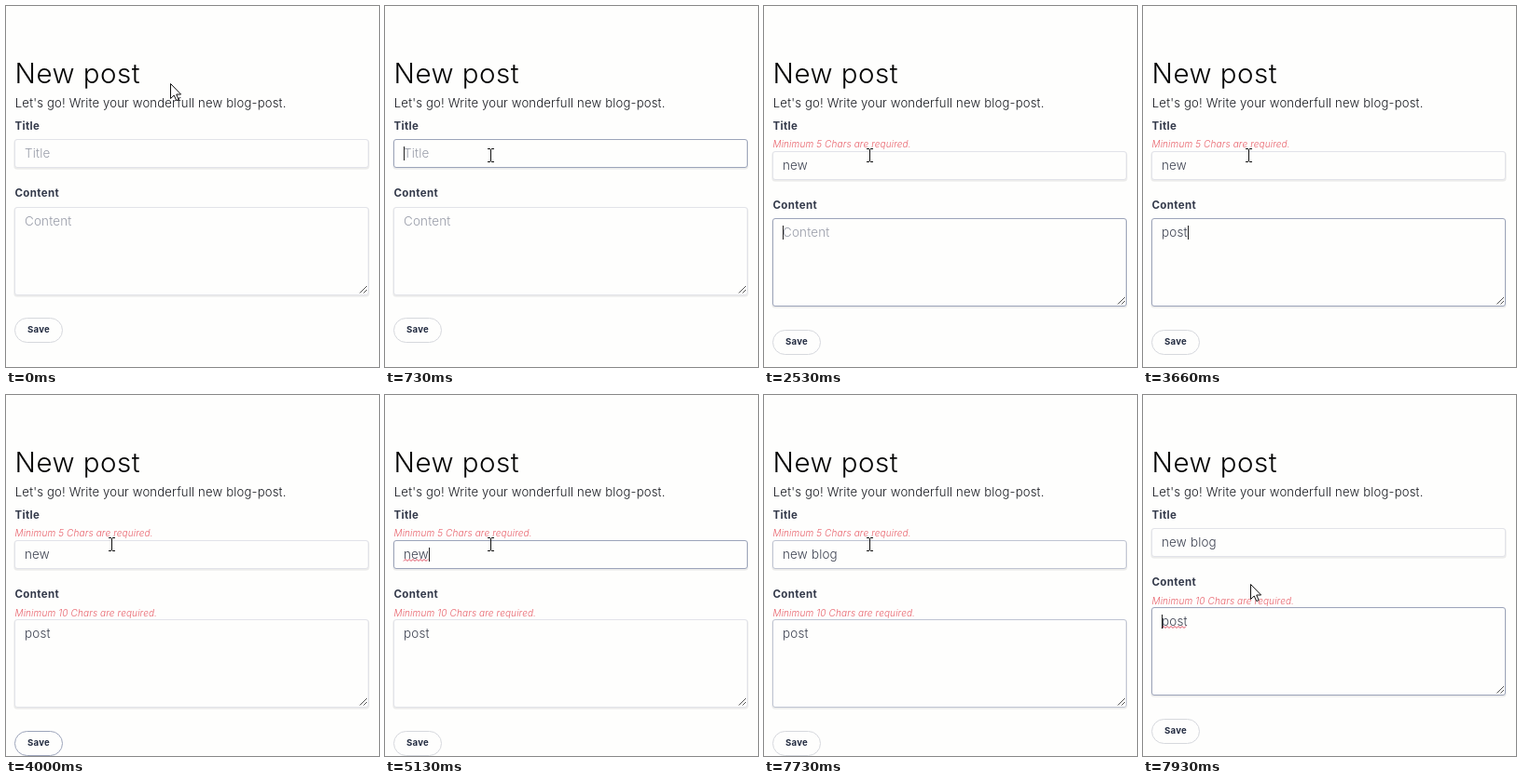
An HTML page that plays this animation: 400x388 px, repeating every 8000 ms.

```html
<!DOCTYPE html>
<html lang="en">
<head>
<meta charset="utf-8">
<title>New post</title>
<style>
  html, body { margin: 0; width: 100%; height: 100%; overflow: hidden; background: #fefefd; }
  svg { display: block; width: 400px; height: 388px; }
  text { font: 300 13px Inter, "Open Sans", sans-serif; white-space: pre; }
  .head { font-size: 29.5px; letter-spacing: .5px; fill: #050505; }
  .lead { font-size: 13.1px; letter-spacing: .18px; fill: #181a20; }
  .label { font-size: 11.5px; font-weight: 700; letter-spacing: .35px; fill: #343a4b; }
  .value { font-size: 13.4px; letter-spacing: .2px; }
  .error { font-size: 10px; font-style: italic; letter-spacing: .13px; fill: #e8606a; }
  .save { font-size: 9.6px; font-weight: 700; letter-spacing: .25px; fill: #222b40; text-anchor: middle; }
  .soft { fill: none; stroke: #000; }
  .box { fill: #fefefd; }
  .wave { fill: none; stroke: #e0455a; stroke-width: 1; }
</style>
</head>
<body>
<svg viewBox="0 0 400 388" aria-label="New post form">
  <rect width="400" height="388" fill="#fefefd"/>
  <text class="head" x="9.5" y="83">New post</text>
  <text class="lead" x="9.8" y="109">Let's go! Write your wonderfull new blog-post.</text>
  <text class="label" x="9.5" y="133">Title</text>
  <text class="error" id="titleError" x="9.5" y="152">Minimum 5 Chars are required.</text>
  <g id="title"></g>
  <g id="lower">
    <text class="label" x="9.5" y="205">Content</text>
    <text class="error" id="areaError" x="9.5" y="224.5">Minimum 10 Chars are required.</text>
  </g>
  <g id="area"></g>
  <g id="save">
    <rect class="box" id="saveBox" x="9.5" y=".5" width="51" height="26" rx="13"/>
    <text class="save" x="35" y="16">Save</text>
  </g>
  <path id="arrow" d="M.5 .5V16.5L4.2 13L6.8 18.6L9.2 17.5L6.7 12H11.6Z" fill="#fff" stroke="#111"/>
  <path id="beam" d="M-3 -6.5H0M1 -6.5H4M.5 -6V7M-3 7.5H0M1 7.5H4" fill="none" stroke="#111"/>
</svg>
<script>
const LOOP = 8000, ERROR_H = 12.7;
const $ = id => document.getElementById(id);

function make(parent, tag, attrs) {
  const el = document.createElementNS('http://www.w3.org/2000/svg', tag);
  set(el, attrs);
  return parent.appendChild(el);
}
function set(el, attrs) {
  for (const k in attrs) el.setAttribute(k, attrs[k]);
}
function show(el, on) { el.style.display = on ? '' : 'none'; }
function shift(el, x, y) { el.setAttribute('transform', `translate(${x} ${y})`); }

function field(id, height, hint, baseline) {
  const g = $(id);
  [[3, .025], [2, .05]].forEach(([w, opacity]) => make(g, 'rect', {
    class: 'soft', x: 9.5, y: 1.5, width: 379, height, rx: 2.5,
    'stroke-width': w, 'stroke-opacity': opacity
  }));
  const box = make(g, 'rect', { class: 'box', x: 9.5, y: .5, width: 379, height, rx: 2.5 });
  const text = make(g, 'text', { class: 'value', x: 20, y: baseline });
  const waves = [0, 1].map(() => make(g, 'path', { class: 'wave' }));
  const caret = make(g, 'rect', { y: baseline - 12, width: 1, height: 15, fill: '#222' });
  return { g, box, text, waves, caret, hint, baseline };
}

const title = field('title', 30, 'Title', 20);
const area = field('area', 94, 'Content', 20);
make(area.g, 'path', { d: 'M379.5 92.5L387 85M383.5 92.5L387 89', stroke: '#555', fill: 'none' });

// Timelines: [time, value...], each value holds until the next
const cursor = [[0, 176, 83], [260, 168, 93], [330, 147, 120], [400, 123, 139], [460, 113, 160],
  [7860, 114, 186], [7930, 115, 203]];
const titleFocus = [[0, 0], [660, .5], [730, 1], [930, .5], [1000, .75], [1060, 1],
  [2460, .4], [2530, 0], [5130, 1], [7730, .5], [7800, 0]];
const areaFocus = [[0, 0], [2460, .6], [2530, 1], [3930, .4], [4000, 0], [7730, .5], [7800, 1]];
const saveFocus = [[0, 0], [3930, 1], [5130, 0]];
const caretIn = [[0, ''], [660, 'title'], [930, ''], [1000, 'title'], [2460, 'area'], [2860, ''],
  [3000, 'area'], [3930, ''], [5130, 'title'], [5530, ''], [5930, 'title'], [7060, ''],
  [7460, 'title'], [7730, ''], [7800, 'start']];
const titleKeys = [1530, 2000, 2060, 6060, 6260, 6400, 6530, 6660];
const areaKeys = [3000, 3200, 3260, 3660];

const at = (line, t) => line.filter(step => step[0] <= t).pop();
const typed = (word, keys, t) => word.slice(0, keys.filter(k => k <= t).length);
const mix = (a, b, k) => `rgb(${a.map((v, i) => Math.round(v + (b[i] - v) * k))})`;
const edge = k => mix([226, 227, 233], [156, 164, 186], k);

function wave(x0, x1, y) {
  let d = `M${x0} ${y}`;
  for (let x = x0 + 2, up = 1; x <= x1; x += 2, up = 1 - up) d += `L${x} ${y - 2 * up}`;
  return d;
}

function drawField(f, y, value, focus, caret, wrong) {
  shift(f.g, 0, y);
  f.text.textContent = value || f.hint;
  f.text.setAttribute('fill', value ? '#3c4150' : '#989ca8');
  f.box.setAttribute('stroke', edge(focus));
  const width = n => n ? f.text.getSubStringLength(0, n) : 0;
  f.waves.forEach((el, i) => {
    const span = wrong[i];
    show(el, span);
    if (span) el.setAttribute('d', wave(20 + width(span[0]), 20 + width(span[1]), f.baseline + 2.5));
  });
  show(f.caret, caret);
  const end = caret === 'start' ? 0 : width(value.length);
  f.caret.setAttribute('x', Math.round(20 + end));
}

function draw(t) {
  const titleBad = t >= 2530 && t < 7800, areaBad = t >= 4000;
  const top = titleBad ? ERROR_H : 0, both = top + (areaBad ? ERROR_H : 0);
  const caret = at(caretIn, t)[1];

  show($('titleError'), titleBad);
  show($('areaError'), areaBad);
  shift($('lower'), 0, Math.round(top));

  const titleWrong = t >= 5130 && t < 7730 ? [[0, 3]] : [];
  if (titleWrong.length && t >= 7460) titleWrong.push([4, 8]);
  drawField(title, Math.round(143.2 + top), typed('new blog', titleKeys, t),
    at(titleFocus, t)[1], caret === 'title' && 'end', titleWrong);
  drawField(area, Math.round(215.6 + both), typed('post', areaKeys, t),
    at(areaFocus, t)[1], caret === 'area' ? 'end' : caret === 'start' && caret,
    t >= 7800 ? [[0, 4]] : []);

  shift($('save'), 0, Math.round(335.2 + both));
  $('saveBox').setAttribute('stroke', mix([214, 216, 221], [156, 164, 186], at(saveFocus, t)[1]));

  const [, x, y] = at(cursor, t);
  const inField = t >= 460 && t < 7860;
  show($('arrow'), !inField);
  show($('beam'), inField);
  shift($(inField ? 'beam' : 'arrow'), x, y);
}

function tick() {
  draw(performance.now() % LOOP);
  requestAnimationFrame(tick);
}
tick();
</script>
</body>
</html>
```
